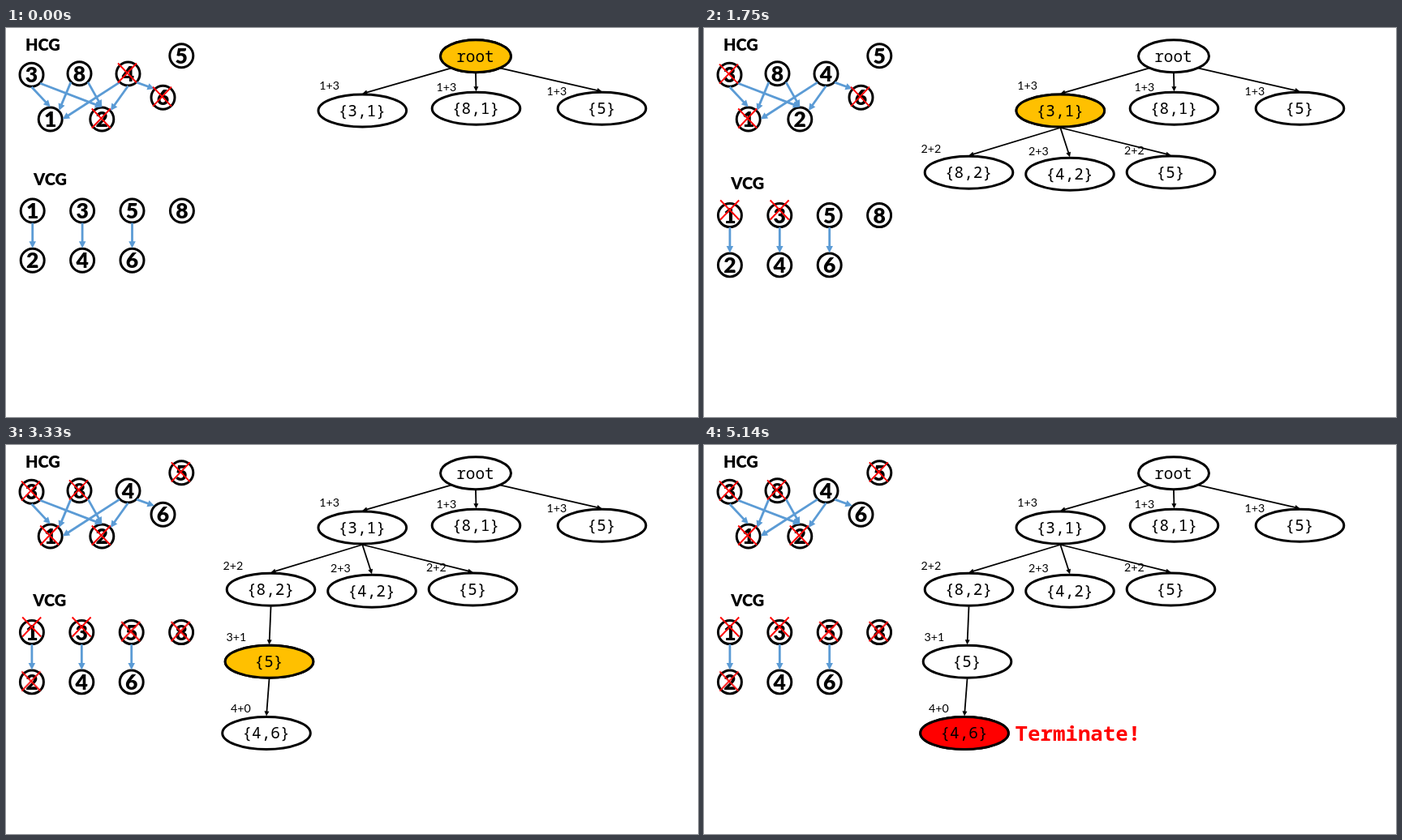
Write an HTML page that moves like this. It is 853 px wide and 480 px high and loops after 5.59 s.

```html
<!DOCTYPE html>
<html lang="en">
<head>
<meta charset="utf-8">
<title>Constraint graph search</title>
<style>
  html, body { margin: 0; width: 100%; height: 100%; overflow: hidden; background: #fff; }
  svg { display: block; width: 853px; height: 480px; }
  .timed { animation: 5590ms step-end infinite; }
  .title { font: 900 20px Lato, sans-serif; }
  .digit { font: 900 26.5px Lato, sans-serif; text-anchor: middle; }
  .label { font: 14.2px Lato, sans-serif; }
  .set { font: 500 19.4px "Noto Sans Mono", monospace; text-anchor: middle; }
  .end { font: 700 25.8px "Noto Sans Mono", monospace; fill: #f00; }
  .ring { fill: #fff; stroke: #000; stroke-width: 3; }
  .cross { fill: none; stroke: #f00; stroke-width: 1.9; }
  .dropped { animation: drop 5590ms step-end infinite; }
  @keyframes drop {
    0% { transform: none; }
    19.1413%, 100% { transform: translate(-0.8px, 5.6px); }
  }
</style>
</head>
<body>
<svg viewBox="0 0 853 480">
  <text class="title" x="24" y="27.5">HCG</text>
  <g id="hcg"></g>
  <g id="vcg" class="dropped"><text class="title" x="34" y="193.5">VCG</text></g>
  <g id="tree" transform="translate(-0.5 0)"></g>
  <g id="marks"></g>
  <g id="droppedMarks" class="dropped"></g>
</svg>
<script>
const LOOP = 5590, FIRST = 1070, STEP = 1130, STEPS = 5;
const BLUE = '#5b9bd5', GOLD = '#ffc000', RED = '#ff0000';
const RADIUS = 14.5;
const [hcg, vcg, tree, marks, droppedMarks] =
  ['hcg', 'vcg', 'tree', 'marks', 'droppedMarks'].map(id => document.getElementById(id));
const sheet = document.head.appendChild(document.createElement('style')).sheet;
const ranges = new Set();

function add(parent, tag, attrs = {}, text) {
  const el = document.createElementNS('http://www.w3.org/2000/svg', tag);
  for (const key in attrs) el.setAttribute(key, attrs[key]);
  if (text !== undefined) el.textContent = text;
  return parent.appendChild(el);
}

// Show an element from one step until another.
function during(el, from, until = STEPS) {
  if (from === 0 && until === STEPS) return;
  const name = `show${from}to${until}`;
  if (!ranges.has(name)) {
    ranges.add(name);
    const frame = (step, state) => {
      const time = step && FIRST + (step - 1) * STEP;
      return `${(time / LOOP * 100).toFixed(4)}% { visibility: ${state}; }`;
    };
    sheet.insertRule(`@keyframes ${name} {
      ${from > 0 ? frame(0, 'hidden') : ''}
      ${frame(from, 'visible')}
      ${until < STEPS ? frame(until, 'hidden') : ''}
      ${frame(STEPS, until < STEPS ? 'hidden' : 'visible')}
    }`);
  }
  el.classList.add('timed');
  el.style.animationName = name;
}

// Point on a shape's outline in a compass direction.
function site({ x, y, rx, ry }, side) {
  const dx = side.includes('E') - side.includes('W');
  const dy = side.includes('S') - side.includes('N');
  const len = Math.hypot(dx, dy);
  return [x + rx * dx / len, y + ry * dy / len];
}

function arrow(parent, [x1, y1], [x2, y2], color, width, head) {
  const len = Math.hypot(x2 - x1, y2 - y1);
  const angle = Math.atan2(y2 - y1, x2 - x1) * 180 / Math.PI;
  const g = add(parent, 'g', { transform: `translate(${x2} ${y2}) rotate(${angle})` });
  add(g, 'path', { d: `M${-len} 0H${-head * 0.7}`, stroke: color, 'stroke-width': width });
  add(g, 'path', { d: `M0 0L${-head} ${-head / 2}V${head / 2}Z`, fill: color });
  return g;
}

function vertex(parent, digit, x, y) {
  add(parent, 'circle', { class: 'ring', cx: x, cy: y, r: RADIUS });
  add(parent, 'text', { class: 'digit', x, y: y + 9.5 }, digit);
  return { x, y, rx: RADIUS + 0.5, ry: RADIUS + 0.5 };
}

function link(parent, from, fromSide, to, toSide) {
  arrow(parent, site(from, fromSide), site(to, toSide), BLUE, 2.8, 8.5);
}

function cross(parent, { x, y }, from, until) {
  const d = `M${x - 12.5} ${y - 13}l23 24m0 -24l-23 24`;
  during(add(parent, 'path', { class: 'cross', d }), from, until);
}

const h = {}, v = {};
const points = { 3: [31.5, 57.7], 8: [90.5, 56.3], 4: [150.5, 56.5], 5: [216.3, 34.3],
                 6: [193.5, 85.7], 1: [54.7, 112.5], 2: [118.3, 112.5] };
for (const digit in points) h[digit] = vertex(hcg, digit, ...points[digit]);
for (const edge of ['3S 1N', '3SE 2N', '8SW 1NE', '8SE 2N', '4SW 1E', '4S 2NE', '4SE 6NW']) {
  const [a, b] = edge.split(' ');
  link(hcg, h[a[0]], a.slice(1), h[b[0]], b.slice(1));
}

['12', '34', '56', '8'].forEach((column, i) => {
  const [top, bottom] = column;
  const x = 32.7 + i * 61.4;
  v[top] = vertex(vcg, top, x, 225.5);
  if (!bottom) return;
  v[bottom] = vertex(vcg, bottom, x, 286.8);
  link(vcg, v[top], 'S', v[bottom], 'N');
});

// The first child at each depth is expanded next.
const root = {
  text: 'root', x: 579.5, y: 34.8, rx: 43.5, children: [
    { text: '{3,1}', x: 439.8, y: 102, cost: 3, label: [-53, -26], side: 'SW', children: [
      { text: '{8,2}', x: 327, y: 178.3, cost: 2, label: [-59, -24.5], children: [
        { text: '{5}', x: 325, y: 267.3, cost: 1, label: [-53, -25], children: [
          { text: '{4,6}', x: 321.5, y: 355.5, cost: 0, label: [-44, -25.5], color: RED }] }] },
      { text: '{4,2}', x: 451.5, y: 180.3, cost: 3, label: [-51, -23.5] },
      { text: '{5}', x: 576, y: 178, cost: 2, label: [-57.5, -22] }] },
    { text: '{8,1}', x: 580, y: 99.3, cost: 3, label: [-49, -21.5] },
    { text: '{5}', x: 735, y: 99.3, cost: 3, label: [-68, -16.5], side: 'SE' }]
};

function grow(node, depth, expanded, parent) {
  const { text, x, y, rx = 54.3, cost, label, side = 'S', color = GOLD, children = [] } = node;
  const g = add(tree, 'g');
  const shape = { class: 'ring', cx: x, cy: y, rx, ry: 20 };
  Object.assign(node, { rx, ry: 21 });
  during(g, Math.max(0, depth - 1));
  if (parent) {
    arrow(g, site(parent, side), site(node, 'N'), '#000', 1.8, 6);
    add(g, 'text', { class: 'label', x: x + label[0], y: y + label[1] }, `${depth}+${cost}`);
  }
  add(g, 'ellipse', shape);
  if (expanded) {
    const lit = add(g, 'ellipse', shape);
    lit.style.fill = color;
    during(lit, depth, depth + 1);
    if (children.length) strike(text, depth);
  }
  add(g, 'text', { class: 'set', x: x - 0.5, y: y + 6.7 }, text);
  children.forEach((child, i) => grow(child, depth + 1, expanded && i === 0, node));
}

// Chosen digits are struck out in both graphs; the first strikes do not drop.
function strike(text, step) {
  for (const digit of text.match(/\d/g) || []) {
    cross(marks, h[digit], step);
    cross(step > 1 ? droppedMarks : marks, v[digit], step);
  }
}

grow(root, 0, true);
cross(marks, h[4], 0, 1);
cross(marks, h[2], 0, 1);
cross(marks, h[6], 0, 3);

during(add(tree, 'text', { class: 'end', x: 384, y: 365 }, 'Terminate!'), STEPS - 1);
</script>
</body>
</html>
```
